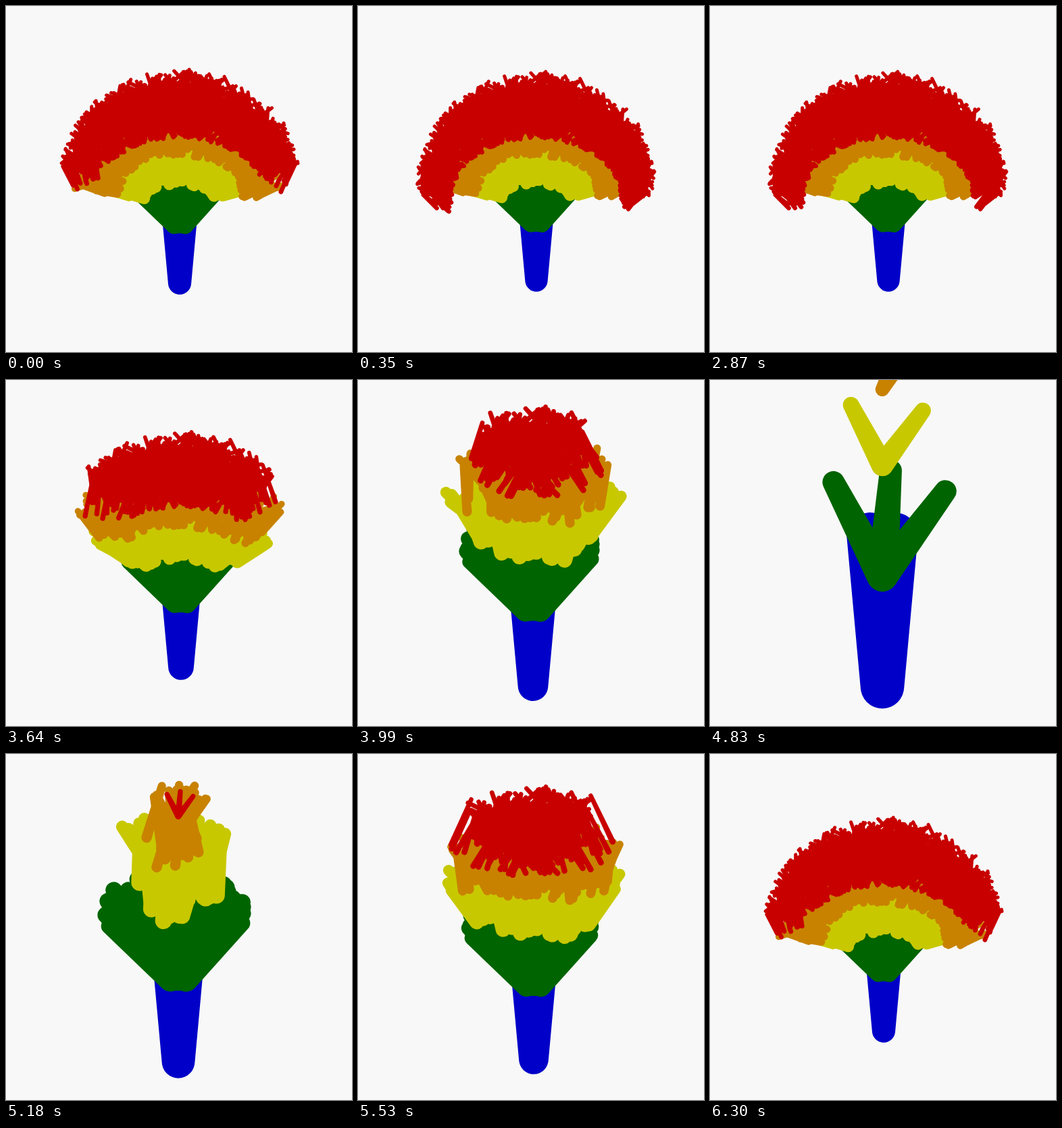
These frames come from a looping animation (512 px wide and 512 px high, 6.37 s). An HTML page:

```html
<!DOCTYPE html>
<html>
<head>
<meta charset="utf-8">
<title>Growing tree</title>
<style>
  html, body { margin: 0; width: 100%; height: 100%; overflow: hidden; background: #f8f8f8; }
  svg { display: block; width: 100%; height: 100%; }
</style>
</head>
<body>
<svg viewBox="0 0 512 512"><g id="tree"></g></svg>
<script>
const STEP = 70, STEPS = 91, FULL = 27;
const WIDEST = 1.7;   // largest angle of a twig from the vertical
const LAG = 3;        // stages by which the innermost twigs come later

// Camera key points: foot of the trunk and zoom at a growth stage.
const camera = [
  { g: 0, x: 230, y: 458, k: 2.03 },
  { g: 1, x: 255, y: 454, k: 1.93 },
  { g: 5, x: 254, y: 456, k: 1.49 },
  { g: 11, x: 260, y: 452, k: 1.307 },
  { g: 15, x: 259, y: 425, k: 1.127 },
  { g: 17, x: 259, y: 425, k: 1.125 },
  { g: 22, x: 257, y: 410, k: 1.023 },
  { g: 26, x: 264, y: 406, k: 1 }
];

// A layer fills the space between two arcs { x, rx, ry, y }.
// reach: share of that space one twig spans; from, to: stages over which it fans out.
// sprout: the small fan of twigs a layer starts with.
const layers = [
  {
    color: '#006400', count: 46, reach: 1, r: [12, 8.5], wobble: 0, from: 2, to: 4,
    inner: { x: 0, rx: 8, ry: 1, y: 83 }, outer: { x: -4, rx: 68, ry: 46, y: 145 },
    sprout: { from: -1, y: 85, count: 3, length: 81 }
  },
  {
    color: '#c8c800', count: 230, reach: .52, r: [8.5, 6.2], wobble: .2, from: 1.5, to: 17,
    inner: { x: 0, rx: 48, ry: 16, y: 126 }, outer: { x: 0, rx: 122, ry: 98, y: 150 },
    sprout: { from: -1, y: 170, count: 2, length: 52 }
  },
  {
    color: '#c88200', count: 320, reach: .5, r: [5.3, 4.2], wobble: .25, from: 4, to: 20,
    inner: { x: 0, rx: 85, ry: 50, y: 134 }, outer: { x: 0, rx: 152, ry: 128, y: 150 },
    sprout: { from: 0, y: 228, count: 5, length: 48 }
  },
  {
    color: '#c80000', count: 1100, reach: .36, r: [3.3, 2.5], wobble: .28, from: 6, to: 25,
    inner: { x: 0, rx: 125, ry: 88, y: 122 }, outer: { x: 0, rx: 174, ry: 158, y: 148 },
    sprout: { from: 3, y: 249, count: 3, length: 25 }
  }
];

let seed = 7;
function rand() {
  seed = (seed * 16807) % 2147483647;
  return seed / 2147483647;
}
const around = size => (rand() * 2 - 1) * size;

const lerp = (a, b, p) => a + (b - a) * p;
const mix = (a, b, p) => [lerp(a[0], b[0], p), lerp(a[1], b[1], p)];
const onArc = (arc, angle) =>
  [arc.x + arc.rx * Math.sin(angle), arc.y + arc.ry * Math.cos(angle)];

// Tapered stroke with round ends.
function capsule(a, b, ra, rb) {
  const dx = b[0] - a[0], dy = b[1] - a[1], len = Math.hypot(dx, dy) || 1;
  const nx = -dy / len, ny = dx / len;
  const at = (p, r) => (p[0] + nx * r).toFixed(2) + ' ' + (p[1] + ny * r).toFixed(2);
  return `M${at(a, ra)}L${at(b, rb)}A${rb} ${rb} 0 0 0 ${at(b, -rb)}` +
    `L${at(a, -ra)}A${ra} ${ra} 0 0 0 ${at(a, ra)}Z`;
}

function grow({ inner, outer, r, reach, wobble, count, from, to, sprout }) {
  const twigs = [];
  const add = (born, a, b) => twigs.push({ born, d: capsule(a, b, ...r) });
  const between = (angle, p) => mix(onArc(inner, angle), onArc(outer, angle), p);

  // The sprout opens from right to left, one twig per stage.
  for (let i = 0; i < sprout.count; i++) {
    const angle = lerp(.64, -.48, i / (sprout.count - 1));
    const tip = [sprout.length * Math.sin(angle), sprout.y + sprout.length * Math.cos(angle)];
    add(sprout.from + i, [0, sprout.y], tip);
  }

  // Later twigs appear from the middle outwards.
  for (let i = 0; i < count; i++) {
    const side = around(1), depth = rand();
    const angle = side * WIDEST, start = depth * (1 - reach);
    const end = (start + reach) * (1 + around(.06));
    const born = lerp(from, to, Math.abs(side)) + LAG * (1 - depth) ** 2;
    add(born, between(angle * .95 + around(wobble), start), between(angle, end));
  }
  return twigs;
}

const tree = document.getElementById('tree');
function addPath(color) {
  const path = document.createElementNS('http://www.w3.org/2000/svg', 'path');
  path.setAttribute('fill', color);
  tree.append(path);
  return path;
}

addPath('#0000c8').setAttribute('d',
  [-9.5, 0, 9.5].map(x => capsule([0, 0], [x, 116], 16.7, 17.8)).join(''));

const crowns = layers.map(layer => ({ path: addPath(layer.color), twigs: grow(layer) }));

// Closed, bloom, hold and back again, one stage per step.
function growthAt(ms) {
  const n = Math.floor(ms / STEP) % STEPS;
  if (n < 41) return Math.min(FULL, 22 + n);
  return n < 68 ? 67 - n : n - 68;
}

function aim(g) {
  const next = camera.findIndex(c => c.g >= g);
  if (next < 0) return camera[camera.length - 1];
  const b = camera[next], a = camera[Math.max(0, next - 1)];
  const p = (g - a.g) / (b.g - a.g || 1);
  return { x: lerp(a.x, b.x, p), y: lerp(a.y, b.y, p), k: lerp(a.k, b.k, p) };
}

let shown = -1;
function draw(ms) {
  const g = growthAt(ms);
  if (g === shown) return;
  shown = g;
  const { x, y, k } = aim(g);
  tree.setAttribute('transform', `translate(${x} ${y}) scale(${k} ${-k})`);
  for (const { path, twigs } of crowns) {
    path.setAttribute('d', twigs.filter(t => t.born <= g).map(t => t.d).join(''));
  }
}

const begin = performance.now();
function tick() {
  draw(performance.now() - begin);
  requestAnimationFrame(tick);
}
tick();
</script>
</body>
</html>
```
